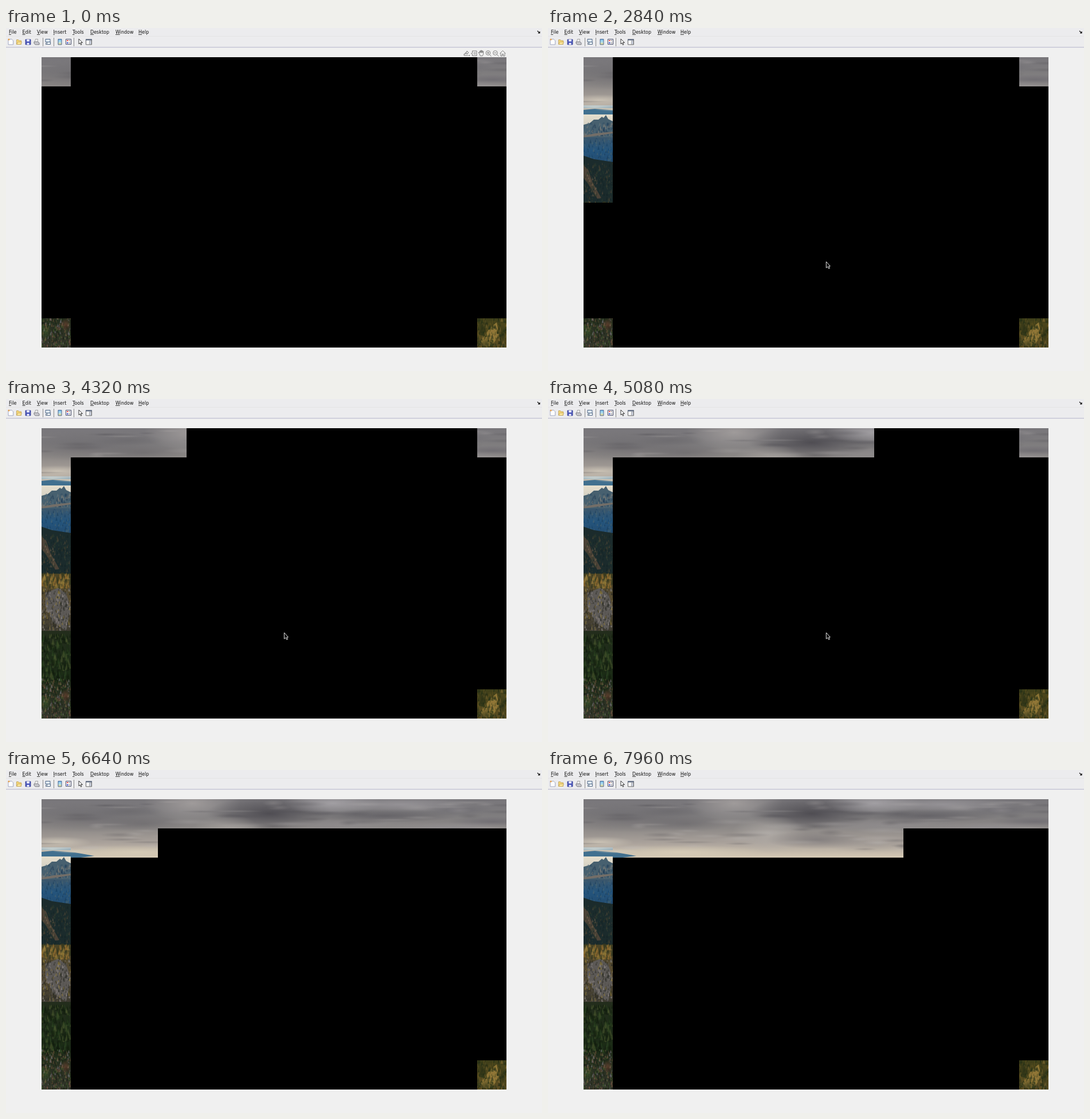
Recreate the animation shown at these times as an HTML page with a canvas. Size 935 px wide and 599 px high, loop 8 s.

```html
<!DOCTYPE html>
<html lang="en">
<head>
<meta charset="utf-8">
<title>Figure</title>
<style>
html, body { margin: 0; width: 100%; height: 100%; overflow: hidden; background: #f0f0f0; }
canvas, svg { position: absolute; left: 0; top: 0; }
text { font: 8px "DejaVu Sans", sans-serif; fill: #111; }
</style>
</head>
<body>
<canvas id="view" width="935" height="599"></canvas>
<svg width="935" height="599" viewBox="0 0 935 599" fill="none" stroke-linejoin="round">
  <path d="M0 14.5H935" stroke="#e4e4e4"/>
  <path d="M0 33.7H935" stroke="#b4b4cb"/>
  <g id="menu"></g>
  <path d="M927 5l4 4M931 6v3h-3" stroke="#111" stroke-width="1.2"/>
  <path d="M64.5 17v15M83.5 17v15M118.5 17v15" stroke="#8c8c8c"/>
  <!-- new, open, save, print -->
  <path d="M4 19.5h6l2.5 2.5v7H4z" fill="#fff" stroke="#8d95b4" stroke-width=".8"/>
  <circle cx="5" cy="20" r="1.5" fill="#e8a24a"/>
  <path d="M18.500 28.500v-8h3l1 1.500h4v6.500z" fill="#f6d878" stroke="#b99a50" stroke-width=".8"/>
  <path d="M18.500 28.500l2-4h7l-2 4z" fill="#ffe99c" stroke="#b99a50" stroke-width=".7"/>
  <path d="M34 20h9v9h-9z" fill="#4a56b8" stroke="#353e90" stroke-width=".8"/>
  <path d="M36 20h5v3.500h-5zM36.500 26h4v3h-4z" fill="#e8eaff"/>
  <path d="M50.500 23.500l1-4h4l-.5 4" fill="#fff" stroke="#777" stroke-width=".7"/>
  <path d="M49 24h7l2 2v3h-7l-2-2z" fill="#c8c8ce" stroke="#65656d" stroke-width=".8"/>
  <!-- link, colorbar, legend -->
  <path d="M69 19.500h8v5h-8z" fill="#dfeaf5" stroke="#405878" stroke-width=".9"/>
  <path d="M71.500 24.500h6v4h-6z" fill="#eef4fa" stroke="#405878" stroke-width=".9"/>
  <path d="M69.500 26v2.500h1.500" stroke="#405878" stroke-width=".9"/>
  <path d="M91 19.500h6v9.500h-6z" fill="url(#bar)" stroke="#4b6691"/>
  <path d="M104.500 19.500h9v9h-9z" fill="#fff" stroke="#454b68"/>
  <path d="M106 22h2.500" stroke="#d44" stroke-width="2"/>
  <path d="M106 26h2.500" stroke="#34c" stroke-width="2"/>
  <path d="M109.500 22h2.500M109.500 26h2.500" stroke="#555"/>
  <!-- pointer, inspector -->
  <path d="M127 19v9l2-2 1.500 3.500 1.500-.7-1.500-3.300h3z" fill="#fff" stroke="#222" stroke-width=".9"/>
  <path d="M139.500 20h10v9h-10z" fill="#fafafa" stroke="#666"/>
  <path d="M139 20.500h11" stroke="#55637c" stroke-width="2"/>
  <path d="M145.500 22.500h3.500v6h-3.500z" fill="#c9cfdd" stroke="#888" stroke-width=".6"/>
  <g id="axesTools" stroke="#737373" stroke-width=".9">
    <path d="M799 45v3h7M800 46q1-4 4-4v-2l3 3-3 3v-2q-2 0-4 2z"/>
    <path d="M807 48h2" stroke-width="1.500"/>
    <path d="M813.500 40h7.500v8.500h-7.500v-3l-2-1 2-1zM815.500 43h4M815.500 45.500h4"/>
    <path d="M826 45l-2-2 1-.8 1.500 1v-3h1.500v3-4h1.600v4-3.500h1.600v3.500-2.500h1.500v5l-1.500 3h-4z"/>
    <path d="M843.500 46.500l3 3M839 43.500h4M841 41.500v4M856.500 46.500l3 3M851.500 43.500h4"/>
    <circle cx="841" cy="43.500" r="3.800"/>
    <circle cx="853.500" cy="43.500" r="3.800"/>
    <path d="M861.500 44.500l5-5 5 5M863 43.500v5.500h2.500v-3.500h2v3.500h2.500v-5.500"/>
  </g>
  <path id="cursor" d="M485.300 408v11l2.500-2.300 1.900 3.600 1.700-.9-1.800-3.400h2.700z" fill="#000" stroke="#e6e6e6"/>
  <defs>
    <linearGradient id="bar" x2="0" y2="1">
      <stop stop-color="#70b9ee"/><stop offset=".55" stop-color="#b9e1e8"/><stop offset="1" stop-color="#f2d678"/>
    </linearGradient>
  </defs>
</svg>
<script>
const $ = id => document.getElementById(id);
const LEFT = 62, TOP = 51.2, COLS = 16, ROWS = 10, TILE = 811 / COLS;
const LOOP = 8000, START = 1975, STEP = 182;
const CURSOR_ON = 400, CURSOR_OFF = 5560;

const labels = { File: 5, Edit: 28.5, View: 54, Insert: 82.5, Tools: 116, Desktop: 147, Window: 191, Help: 231 };
$('menu').innerHTML = Object.entries(labels).map(([s, x]) =>
  `<text x="${x}" y="10"><tspan text-decoration="underline">${s[0]}</tspan>${s.slice(1)}</text>`).join('');

let seed = 7;
const rnd = () => (seed = seed * 16807 % 2147483647) / 2147483647;

const scene = document.createElement('canvas');
scene.width = 935;
scene.height = 599;
const g = scene.getContext('2d');

function band(x, y, w, h, ...colors) {
  const grad = g.createLinearGradient(0, y, 0, y + h);
  colors.forEach((c, i) => grad.addColorStop(i / (colors.length - 1), c));
  g.fillStyle = grad;
  g.fillRect(x, y, w, h);
}

function poly(color, ...pts) {
  g.fillStyle = color;
  g.beginPath();
  for (let i = 0; i < pts.length; i += 2) g.lineTo(pts[i], pts[i + 1]);
  g.fill();
}

// Soft elliptical cloud; rgb is "r,g,b"
function cloud(x, y, rx, ry, rgb, alpha) {
  g.save();
  g.translate(x, y);
  g.scale(rx, ry);
  const grad = g.createRadialGradient(0, 0, 0, 0, 0, 1);
  grad.addColorStop(0, `rgba(${rgb},${alpha})`);
  grad.addColorStop(1, `rgba(${rgb},0)`);
  g.fillStyle = grad;
  g.fillRect(-1, -1, 2, 2);
  g.restore();
}

// Scattered small translucent spires suggesting foliage or rock
function spires(x, y, w, h, count, size, ...colors) {
  g.save();
  g.beginPath();
  g.rect(x, y, w, h);
  g.clip();
  g.globalAlpha = .6;
  for (let i = 0; i < count; i++) {
    const px = x + rnd() * w, py = y + h * i / count, s = size * (.5 + rnd());
    poly(colors[Math.floor(rnd() * colors.length)], px, py - s, px + s * .5, py + s, px - s * .5, py + s);
  }
  g.restore();
}

function paintScene() {
  // Sky
  band(62, 51, 811, 102, '#78767a', '#7d7b7d', '#8d8987', '#aaa29b', '#d6cab5');
  cloud(150, 83, 150, 26, '98,96,101', .5);
  cloud(325, 58, 85, 32, '172,167,165', .75);
  cloud(240, 94, 80, 14, '100,98,102', .5);
  cloud(215, 72, 60, 10, '98,96,100', .4);
  cloud(460, 76, 110, 30, '74,72,78', .9);
  cloud(385, 112, 65, 34, '180,175,170', .7);
  cloud(470, 122, 90, 16, '112,109,112', .6);
  cloud(570, 58, 85, 20, '172,169,173', .8);
  cloud(690, 60, 130, 14, '160,157,161', .7);
  cloud(660, 80, 130, 12, '88,86,92', .65);
  cloud(590, 97, 130, 12, '145,142,145', .55);
  cloud(790, 70, 60, 10, '102,100,107', .5);
  cloud(850, 90, 80, 9, '98,96,105', .55);
  cloud(780, 100, 120, 9, '150,147,152', .55);
  cloud(560, 130, 80, 14, '150,145,142', .5);
  cloud(230, 143, 150, 12, '224,213,188', .6);
  cloud(90, 126, 60, 10, '215,207,191', .7);
  // Wisps
  for (let i = 0; i < 90; i++) {
    const shade = rnd() < .5 ? '70,68,74' : '190,186,184';
    cloud(62 + rnd() * 811, 55 + rnd() * 88, 15 + rnd() * 35, 2 + rnd() * 4, shade, .22);
  }
  band(62, 135, 51, 5, '#b8c1c5', '#7fa0b2');
  poly('#41708f', 62, 143, 82, 141, 120, 144, 154, 150, 130, 153, 62, 153);
  cloud(80, 138, 40, 4, '222,224,214', .7);
  cloud(120, 142, 40, 4, '214,208,192', .6);

  // Mountain
  band(62, 151, 51, 20, '#e6dfcd', '#d4d0c4');
  poly('#47606f', 62, 169, 73, 166, 80, 160, 88, 160, 94, 155, 97, 157, 101, 152, 105, 159, 113, 163, 113, 235, 62, 235);
  spires(62, 165, 51, 24, 80, 3, '#243e56', '#85827a', '#526b7a', '#2b4a63');
  poly('#736e68', 62, 188, 82, 184, 113, 181, 113, 184, 80, 189, 62, 191);
  band(62, 191, 51, 45, '#3b566b', '#24547c', '#234c71');
  spires(62, 192, 51, 44, 110, 2.5, '#174268', '#33617f', '#4b6670', '#1c3d59');

  // Dark slope with a bare ridge
  poly('#1b2b2c', 62, 223, 80, 229, 113, 234, 113, 310, 62, 310);
  poly('#4b4237', 62, 240, 70, 247, 78, 270, 93, 297, 86, 298, 70, 272, 62, 262);
  spires(62, 235, 51, 72, 170, 2.5, '#142324', '#293a31', '#33372c', '#4e4636');
  spires(64, 250, 22, 44, 50, 2, '#443b32', '#7a664f', '#303a2c');

  // Autumn trees and cliff
  band(62, 305, 51, 100, '#4b4425', '#594d34', '#3c3a30');
  spires(62, 303, 51, 28, 110, 4, '#9a6f2f', '#74662b', '#2c371f', '#a58640', '#3a3a20');
  poly('#5d5a57', 70, 338, 91, 330, 105, 339, 113, 365, 105, 405, 82, 390, 68, 360);
  spires(62, 331, 51, 85, 330, 2.5, '#918b88', '#302f28', '#8f7c35', '#55514c', '#22251e');

  // Evergreens and undergrowth
  band(62, 405, 51, 153, '#232d1c', '#1c2a17', '#33352a');
  spires(62, 410, 51, 85, 240, 4.5, '#101d0e', '#2b4422', '#47552d', '#1c2e15', '#14200f');
  spires(62, 488, 51, 70, 330, 2.5, '#1c2a18', '#665035', '#77737c', '#181a14', '#486032', '#80594a');
  cloud(104, 518, 9, 12, '165,83,62', .4);
  cloud(69, 530, 10, 15, '68,112,46', .4);

  band(822, 507, 51, 51, '#3c3d19', '#5e501f', '#544823');
  poly('#8f7636', 844, 524, 856, 514, 860, 535, 850, 552, 839, 558, 828, 548);
  spires(822, 507, 51, 51, 190, 3, '#1c2612', '#917538', '#584e20', '#28331a', '#2c3517');
  cloud(831, 525, 10, 17, '30,41,19', .75);
  cloud(866, 535, 10, 18, '30,41,19', .75);
  cloud(838, 552, 10, 11, '30,41,19', .65);
}
paintScene();

const ctx = $('view').getContext('2d');

function showTile(col, row) {
  const x = Math.round(LEFT + col * TILE), y = Math.round(TOP + row * TILE);
  const w = Math.round(LEFT + (col + 1) * TILE) - x, h = Math.round(TOP + (row + 1) * TILE) - y;
  ctx.drawImage(scene, x, y, w, h, x, y, w, h);
}

function draw(now) {
  const t = now % LOOP;
  const placed = Math.max(0, Math.floor((t - START) / STEP));
  ctx.fillStyle = '#f0f0f0';
  ctx.fillRect(0, 0, 935, 599);
  ctx.fillStyle = '#ececee';
  ctx.fillRect(0, 0, 935, 33);
  ctx.fillStyle = '#000';
  ctx.fillRect(LEFT, 51, 811, 507);
  for (const col of [0, COLS - 1]) for (const row of [0, ROWS - 1]) showTile(col, row);
  // Left edge first, then rows from left to right
  for (let i = 0; i < placed; i++) {
    if (i < ROWS - 2) showTile(0, i + 1);
    else {
      const k = i - (ROWS - 2);
      showTile(1 + k % (COLS - 2), Math.floor(k / (COLS - 2)));
    }
  }
  $('axesTools').style.display = placed ? 'none' : '';
  $('cursor').style.display = t >= CURSOR_ON && t < CURSOR_OFF ? '' : 'none';
  requestAnimationFrame(draw);
}
draw(0);
</script>
</body>
</html>
```
